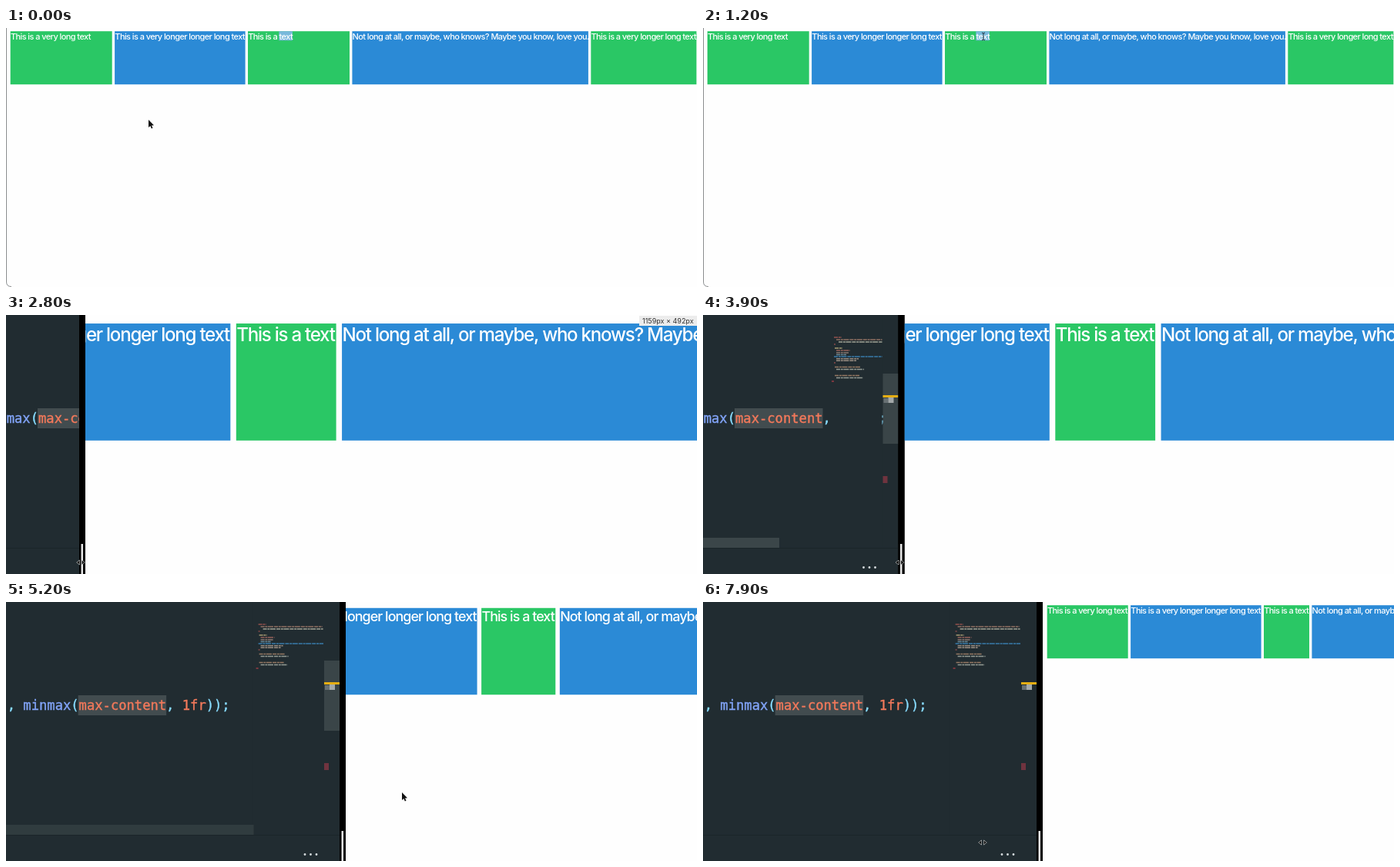
An HTML page with a canvas that plays this animation: 897x336 px, repeating every 8000 ms.

```html
<!DOCTYPE html>
<html lang="en">
<head>
<meta charset="utf-8">
<title>Resizing a grid</title>
<style>
  html, body { margin: 0; width: 100%; height: 100%; overflow: hidden; background: #fefefe; }
  canvas { display: block; width: 897px; height: 336px; }
</style>
</head>
<body>
<canvas id="stage"></canvas>
<script>
const W = 897, H = 336, LOOP = 8000, STEP = 100;
const canvas = document.getElementById('stage');
const ctx = canvas.getContext('2d');
const dpr = window.devicePixelRatio || 1;
canvas.width = W * dpr;
canvas.height = H * dpr;

const GREEN = '#2ac765', BLUE = '#2b8ad6', EDITOR = '#212c31';
const CYAN = '#89ddff', ORANGE = '#f3795b', PERIWINKLE = '#82a4f8';
const PAGE_FONT = '500 10.96px Inter, sans-serif';
const CODE_FONT = '17.15px "DejaVu Sans Mono", monospace';
const GAP = 3.4, MARGIN = 5.7, SPLIT = 8;

const cells = [
  ['This is a very long text', 105],
  ['This is a very longer longer long text', 169.5],
  ['This is a text', 59],
  ['Not long at all, or maybe, who knows? Maybe you know, love you.', 306.5],
  ['This is a very longer long text', 137]
];

// Keyframes: [time, ...values]
const editorKeys = [[2100, -8], [2800, 95], [3600, 253.5], [3900, 253.5], [4600, 433]];
const zoomKeys = [[1200, 1], [1300, 1.15], [1400, 1.5], [1500, 1.9], [1600, 2.12], [1700, 2.2],
  [4900, 2.2], [5200, 1.63], [5600, 1]];
const mouseKeys = [[200, 185, 119], [400, 364, 11], [1500, 364, 11], [1900, 364, 60], [2100, -6, 321]];
const mouseEndKeys = [[4600, 435, 321], [5000, 514, 247], [6700, 514, 247],
  [7100, 712, 130], [7600, 645, 270], [7900, 363, 312]];

function track(keys, t) {
  if (t <= keys[0][0]) return keys[0].slice(1);
  for (let i = 1; i < keys.length; i++) {
    const a = keys[i - 1], b = keys[i];
    if (t <= b[0]) {
      const k = (t - a[0]) / (b[0] - a[0]);
      return a.slice(1).map((v, j) => v + (b[j + 1] - v) * k);
    }
  }
  return keys[keys.length - 1].slice(1);
}

function rect(x, y, w, h, color) {
  ctx.fillStyle = color;
  ctx.fillRect(x, y, w, h);
}

function poly(points, fill, stroke, width = 1) {
  ctx.beginPath();
  points.forEach(([x, y]) => ctx.lineTo(x, y));
  ctx.closePath();
  ctx.lineWidth = width;
  ctx.lineJoin = 'round';
  ctx.strokeStyle = stroke;
  ctx.stroke();
  ctx.fillStyle = fill;
  ctx.fill();
}

function clipped(x, w, draw) {
  ctx.save();
  ctx.beginPath();
  ctx.rect(x, 0, w, H);
  ctx.clip();
  draw();
  ctx.restore();
}

// minmax(max-content, 1fr): only the first and third cells have room to give
function cellWidths(paneX) {
  const widths = cells.map(c => c[1]);
  const free = 264 - paneX;
  widths[0] = Math.max(105, free / 2);
  widths[2] = Math.max(59, free - widths[0]);
  return widths;
}

// Zooming out keeps the point under the mouse until the page edge is reached
function panX(t, zoom, paneX) {
  if (t < 4900) return 363 * (zoom - 1);
  return Math.min(508.5 * zoom / 2.2 - 73, (W - paneX + 7) * (zoom - 1));
}

function drawPage(t, paneX) {
  const [zoom] = track(zoomKeys, t);
  const widths = cellWidths(paneX);
  clipped(paneX, W - paneX, () => {
    rect(paneX, 0, W - paneX, H, '#fefefe');
    ctx.translate(paneX - panX(t, zoom, paneX), -1.5 + 5.7 * zoom);
    ctx.scale(zoom, zoom);
    ctx.font = PAGE_FONT;
    ctx.letterSpacing = '-0.57px';
    let x = MARGIN;
    cells.forEach(([text], i) => {
      rect(x, 0, widths[i], 69, i % 2 ? BLUE : GREEN);
      if (i === 2 && t < 1300) {
        const start = ctx.measureText('This is a ').width;
        rect(x + start, 0, ctx.measureText('text').width, 12, '#79b9dc');
      }
      ctx.fillStyle = '#fff';
      ctx.fillText(text, x + .2, 10.4);
      x += widths[i] + GAP;
    });
    ctx.letterSpacing = '0px';
  });
  if (t > 2100 && t < 3800) drawSize(paneX);
}

function drawSize(paneX) {
  rect(822, 1, 75, 13, '#ececec');
  ctx.font = '9px Inter, sans-serif';
  ctx.fillStyle = '#333';
  ctx.fillText(Math.round(1309 - paneX * 1.46) + 'px × 492px', 826, 11);
}

function drawCode(x) {
  ctx.font = CODE_FONT;
  ctx.lineWidth = .4;
  const char = ctx.measureText('m').width;
  rect(x - 1, 121, char * 11 + 1, 26, '#424c4f');
  const parts = [[', ', CYAN], ['minmax', PERIWINKLE], ['(', CYAN], ['max-content', ORANGE],
    [', ', CYAN], ['1fr', ORANGE], ['));', CYAN]];
  let cx = x - 9 * char;
  for (const [text, color] of parts) {
    ctx.fillStyle = ctx.strokeStyle = color;
    ctx.fillText(text, cx, 140);
    ctx.strokeText(text, cx, 140);
    cx += text.length * char;
  }
}

function drawMinimap(x, right) {
  const rows = [
    [29, 5, 10, '#93504c'], [32, 8, 80, '#8f6f62'], [35, 11, 78, '#a3a496'], [38, 5, 2, '#8a4a4a'],
    [43, 6, 10, '#a79a72'], [46, 8, 18, '#94605a'], [49, 8, 16, '#8b7770'], [51.5, 8, 13, '#6b8a99'],
    [54, 5, 86, '#397baa'], [56.7, 8, 29, '#998d83'], [59.3, 8, 26, '#998d83'], [62, 5, 2, '#8a4a4a'],
    [67.5, 6, 33, '#947762'], [70.5, 8, 36, '#929a93'], [78.5, 6, 32, '#947762'],
    [81.5, 8, 35, '#929a93'], [86, 2, 3, '#9b3c45']
  ];
  clipped(x, right - x, () => {
    ctx.lineWidth = 1.5;
    ctx.setLineDash([5, .8, 3, .6, 7, 1]);
    for (const [y, dx, w, color] of rows) {
      ctx.strokeStyle = color;
      ctx.beginPath();
      ctx.moveTo(x + dx, y);
      ctx.lineTo(x + dx + w, y);
      ctx.stroke();
    }
    ctx.setLineDash([]);
  });
}

function drawEditor(t, w) {
  const wide = w > 200;
  const mapX = 165 + .878 * (w - 253.5);
  const fade = Math.max(0, Math.min(1, (5500 - t) / 500));
  clipped(0, w, () => {
    rect(0, 0, w, H, EDITOR);
    drawCode(wide ? Math.max(42, mapX - 228) : 42);
    rect(0, 302, w, 1, '#1b2529');
    if (!wide) return;

    rect(mapX - 2, 0, w - 19 - mapX, 301, EDITOR);
    drawMinimap(mapX, w - 21);
    ctx.globalAlpha = fade;
    rect(0, 289, 99 + 1.24 * (w - 253.5), 13, '#3b4649');
    ctx.globalAlpha = t < 5500 ? 1 : Math.max(0, 1 - (t - 5500) / 600);
    rect(w - 20, 76, 20, 91, '#3a4548');
    ctx.globalAlpha = 1;
    rect(w - 20, 104, 20, 3, '#e5ae13');
    rect(w - 19, 108, 6, 6, '#687174');
    rect(w - 13, 107, 7, 7, '#a3a9aa');
    rect(w - 20, 209, 6, 9, '#70343f');
    ctx.fillStyle = '#d5dbdd';
    for (let i = -1; i < 2; i++) {
      ctx.beginPath();
      ctx.arc(w - 37.5 + i * 7.5, 327.5, 1.4, 0, 7);
      ctx.fill();
    }
  });
  rect(w, 0, SPLIT, H, '#000');
  rect(w + 2.5, 297, 2.5, H - 297, '#e8e8e8');
}

function arrow() {
  poly([[0, 0], [0, 10], [2.3, 8], [3.9, 11.5], [5.5, 10.8], [4, 7.4], [7, 7.2]], '#111', '#fff', 1.4);
}

function ibeam() {
  ctx.strokeStyle = '#26363f';
  ctx.lineWidth = 1;
  ctx.beginPath();
  for (const s of [-1, 1]) {
    ctx.moveTo(-2, 5 * s);
    ctx.lineTo(0, 4 * s);
    ctx.lineTo(2, 5 * s);
  }
  ctx.moveTo(0, -4);
  ctx.lineTo(0, 4);
  ctx.stroke();
}

function resizer() {
  for (const s of [-1, 1]) poly([[s * 1.5, -2.8], [s * 5.2, 0], [s * 1.5, 2.8]], '#1a1a1a', '#e6eaea');
}

function drawMouse(t, w) {
  if (t >= 1500 && t < 1900) return;
  let pos = track(t < 4600 ? mouseKeys : mouseEndKeys, t);
  let shape = arrow;
  if (t >= 400 && t < 1500) shape = ibeam;
  if (t >= 2100 && t < 4700) {
    shape = resizer;
    pos = [w + 2, 321];
  }
  if (t >= 7900) shape = resizer;
  ctx.save();
  ctx.translate(...pos);
  shape();
  ctx.restore();
}

function drawFrame() {
  ctx.strokeStyle = '#8b8e90';
  ctx.lineWidth = 1;
  ctx.beginPath();
  ctx.moveTo(.5, 0);
  ctx.lineTo(.5, 329);
  ctx.quadraticCurveTo(.5, 335.5, 7, 335.5);
  ctx.stroke();
}

function render(t) {
  ctx.setTransform(dpr, 0, 0, dpr, 0, 0);
  const [w] = track(editorKeys, t);
  drawPage(t, w + SPLIT);
  if (w > -SPLIT) drawEditor(t, Math.max(0, w));
  if (w <= 0) drawFrame();
  drawMouse(t, w);
}

function tick() {
  const t = performance.now() % LOOP;
  render(Math.floor(t / STEP) * STEP);
  requestAnimationFrame(tick);
}
tick();
</script>
</body>
</html>
```
